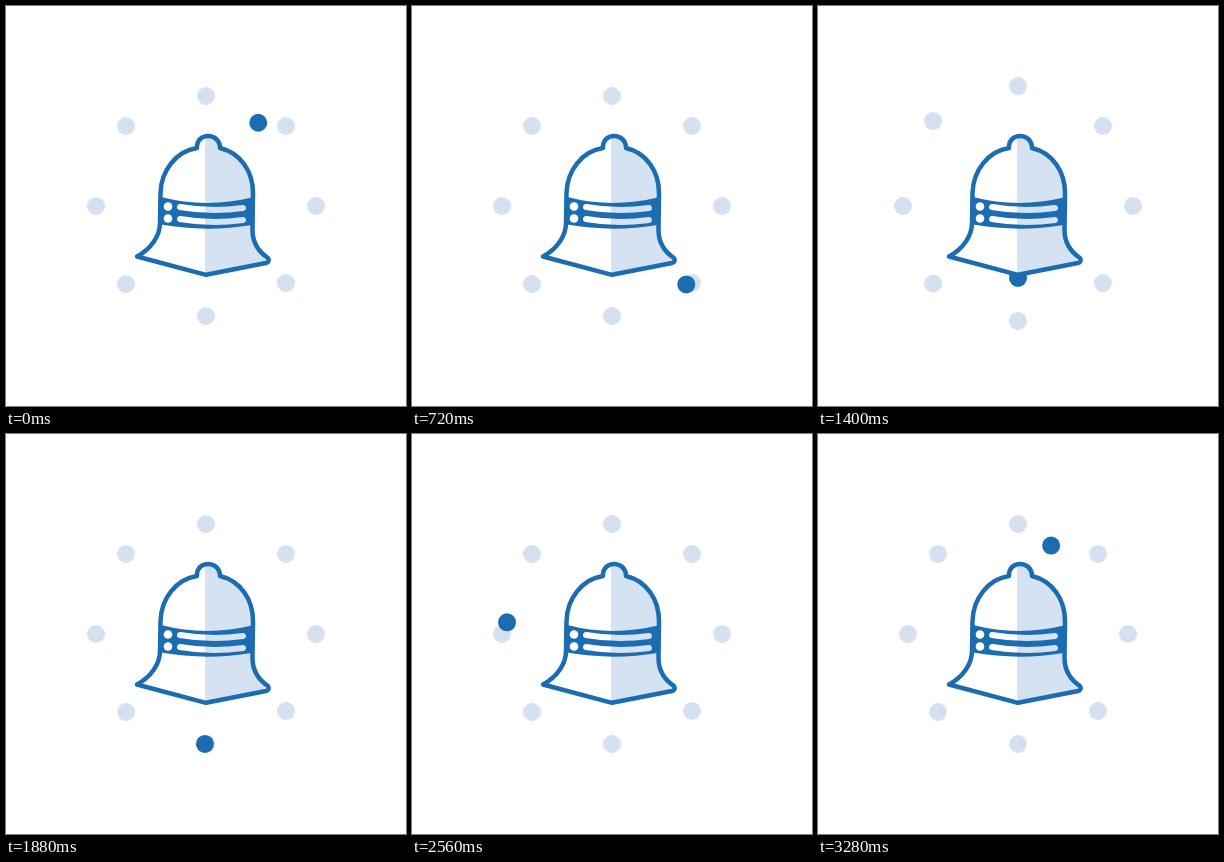
These frames come from a looping animation (400 by 400 pixels, 3.32 s). An HTML page:

```html
<!DOCTYPE html>
<html lang="en">
<head>
<meta charset="utf-8">
<title>Bell loader</title>
<style>
  html, body { margin: 0; height: 100%; overflow: hidden; background: #fff; }
  svg { display: block; width: 100vw; height: 100vh; }
</style>
</head>
<body>
<svg viewBox="0 0 400 400">
  <defs>
    <linearGradient id="halves" gradientUnits="userSpaceOnUse" x1="0" y1="0" x2="400" y2="0">
      <stop offset=".4975" stop-color="#fff"/>
      <stop offset=".4975" stop-color="#d5e2f2"/>
    </linearGradient>
  </defs>
  <g id="ring" fill="#d5e1f1"></g>
  <circle id="ball" r="9" fill="#1c6cb1"/>
  <g stroke-linejoin="round" stroke-linecap="round">
    <path fill="url(#halves)" stroke="#1c6cb1" stroke-width="4.500" d="M191 142
      C190 126 214 126 214 142 C235 147 247 166 247 187 L246.500 224
      C246.500 237 253 246 262 252 Q264 256 260 257 L200 268.800 L131 250.500
      C145 243 154 230 154 217 L154.500 187 C155 165 170 145 191 142 Z"/>
    <path fill="#1c6cb1" d="M155 191 Q200 202.500 246 191.500 V219 Q200 226.500 155 218.500 Z"/>
    <g fill="none" stroke="url(#halves)" stroke-width="6">
      <path d="M174 201 Q205 206.500 237 202"/>
      <path d="M174 213 Q205 218.500 237 214"/>
    </g>
    <g fill="#fff">
      <circle cx="162" cy="200.500" r="4.300"/>
      <circle cx="162" cy="212.500" r="4.300"/>
    </g>
  </g>
</svg>
<script>
const LOOP = 3320, TAU = 2 * Math.PI, C = 200;
// x, y and outward push of each dot, clockwise from the top
const dots = [
  [200, 90, 0, -20], [280, 120, 10, 0], [310, 200, 10, 0], [280, 277, 10, 0],
  [200, 310, 0, 10], [120, 278, -10, -1], [90, 200, -10, 0], [120, 120, -10, -10]
];
// arrival times at the dots, from the bottom round to the lower right
const stops = [1840, 2168, 2478, 2760, 3137, 3438, 3640, 3970];
const CLAPPER = [200, 272], HIT = 960, DROP = 1600;

const ring = document.getElementById('ring');
const ball = document.getElementById('ball');
const circles = dots.map(() => {
  const c = document.createElementNS('http://www.w3.org/2000/svg', 'circle');
  c.setAttribute('r', 9);
  return ring.appendChild(c);
});

const place = (el, x, y) => {
  el.setAttribute('cx', x);
  el.setAttribute('cy', y);
};
const mix = (a, b, p) => a + (b - a) * p;
const ease = u => u - Math.sin(TAU * u) / TAU;
const swell = t => t > 800 && t < 1600 ? (1 - Math.cos(TAU * (t - 800) / 800)) / 2 : 0;

function polar([x, y]) {
  const a = Math.atan2(x - C, C - y);
  return [(a + TAU) % TAU, Math.hypot(x - C, y - C)];
}

// hop between neighbouring dots, dipping towards the centre
function hop(i, u) {
  const [a, r] = polar(dots[i % 8]);
  let [b, s] = polar(dots[(i + 1) % 8]);
  if (b < a) b += TAU;
  const p = ease(u);
  const dip = 17 * Math.sin(Math.PI / 2 * Math.sin(Math.PI * p) ** 2);
  const angle = mix(a, b, p), radius = mix(r, s, p) - dip;
  return [C + radius * Math.sin(angle), C - radius * Math.cos(angle)];
}

function ballAt(t) {
  const swing = stops[7] - LOOP;
  if (t >= swing && t < stops[0]) {
    if (t < HIT) {
      const p = ease((t - swing) / (HIT - swing));
      return [mix(280, CLAPPER[0], p), mix(277, CLAPPER[1], p) + 8 * Math.sin(Math.PI * p)];
    }
    const p = ease(Math.max(0, (t - DROP) / (stops[0] - DROP)));
    return [CLAPPER[0], mix(CLAPPER[1], 310, p)];
  }
  if (t < swing) t += LOOP;
  const i = stops.findIndex((s, k) => t >= s && t < stops[k + 1]);
  return hop(i + 4, (t - stops[i]) / (stops[i + 1] - stops[i]));
}

function draw(now) {
  const t = now % LOOP, k = swell(t);
  dots.forEach(([x, y, dx, dy], i) => place(circles[i], x + dx * k, y + dy * k));
  place(ball, ...ballAt(t));
}

const start = performance.now();
function tick() {
  draw(performance.now() - start);
  requestAnimationFrame(tick);
}
tick();
</script>
</body>
</html>
```
